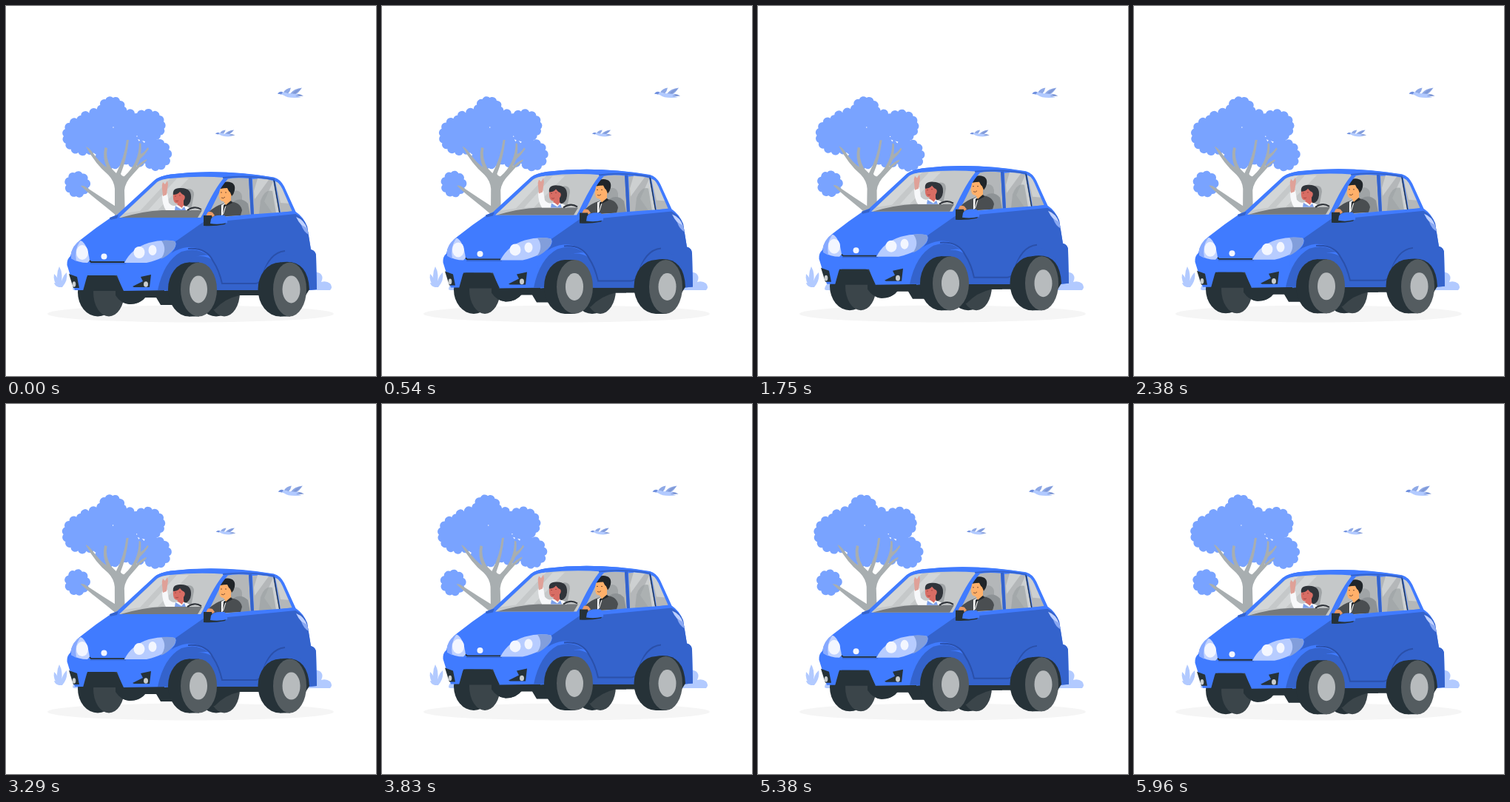
An HTML page for the animation above (6000 ms loop, 500x500 px).

```html
<!DOCTYPE html>
<html lang="en">
<head>
<meta charset="utf-8">
<title>Car trip</title>
<style>
html, body { margin: 0; width: 100%; height: 100%; overflow: hidden; background: #fff; }
svg { display: block; width: 100vw; height: 100vh; }
</style>
</head>
<body>
<svg viewBox="0 0 500 500">
  <defs>
    <g id="bird">
      <path fill="#8fa9e6" d="M8 6Q11 1 18 0Q17 5 14 8ZM17 8Q22 1 33 0L30 4Q27 8 20 11Z"/>
      <path fill="#7f98d6" d="M20 8Q25 2 32 1L24 8ZM23 9Q29 7 35 11Q27 12 22 12Z"/>
      <path fill="#b2caff" d="M0 8Q3 4 8 6Q14 8 20 8Q26 8 29 10L24 11L32 13Q14 15 8 10Q4 8 0 8Z"/>
      <path fill="#6f8fdd" d="M0 8Q3 4 7 6L5 9Z"/>
    </g>
  </defs>

  <ellipse cx="249.5" cy="416" rx="193.5" ry="11.5" fill="#f5f5f5"/>

  <g fill="#b2caff">
    <path d="M72 380Q66 364 72 352Q78 362 74 380ZM71 380Q63 372 65 362Q72 368 73 380ZM74 380Q75 366 82 360Q84 371 76 380ZM72 380Q66 379 65 374Q70 374 74 380Z"/>
    <path d="M90 383Q91 374 98 375L110 384H92Z"/>
    <path d="M405 384V362Q416 357 424 361Q430 365 426 373Q433 371 438 375Q442 380 438 384Z"/>
  </g>

  <g id="tree">
    <path id="leaves" fill="#79a3ff"/>
    <g fill="#fff"><path d="M178 180l3 1l-1 2zM184 182l4 1l-1 2z"/><circle cx="145" cy="164" r=".7"/><circle cx="177" cy="176" r=".7"/></g>
    <g fill="#a8aeb0">
      <path d="M147 290L147 247Q146 236 138 228Q121 214 108 190Q112 191 117 198Q127 212 136 218Q130 205 133.500 191L137 192Q134 205 142 219L149 226Q160 205 163 181L166 181Q163 207 155 227Q157 231 160 230Q180 212 180 185L182.500 186Q183 194 182 200Q187 198 191.500 191L193 193Q188 201 181 207Q179 212 176 217Q183 210 190 207L190 209Q180 217 171 228Q161 238 160 249L161 290Z"/>
      <path d="M101 243Q105 242 110 246Q131 260 150 272V284Q137 273 123 262Q108 250 101 243Z"/>
    </g>
  </g>

  <g id="birds">
    <use href="#bird" x="367" y="110.500"/>
    <use href="#bird" transform="translate(283 167.500) scale(.76 .66)"/>
  </g>

  <g id="car">
    <!-- underside and far wheels -->
    <path fill="#263238" d="M100 375H405V391H316L230 404H209L203 394H187Q181 403 167 403Q155 402 148 391L140 384H100Z"/>
    <ellipse cx="124" cy="387" rx="27" ry="32.500" fill="#263238"/>
    <ellipse cx="139" cy="387" rx="21" ry="32.500" fill="#3b454a"/>
    <path fill="#263238" d="M148 380H190V392Q182 403 167 403Q155 402 148 391Z"/>
    <ellipse cx="284" cy="387" rx="27" ry="32.500" fill="#263238"/>
    <ellipse cx="295" cy="387" rx="21" ry="32.500" fill="#3b454a"/>
    <path fill="#263238" d="M272 380H330V391H316Q296 395 282 410H272Z"/>

    <!-- body -->
    <path fill="#407bff" d="M93 384L82.500 350Q82 342 87 338Q89 324 102 315Q122 299 143 285L150 282L201 235Q207 230 222 227.500Q290 219.500 362 231.500Q371 234 376 244L391.500 278Q402 285 407 298L412 329Q419 331 419 338L420 383L409 384H225L158 385L150 364H110L106 384Z"/>
    <path fill="#3463cc" d="M228 328Q232 319 228 319L268 291L300 290L391.500 281Q402 286 407 298L412 329Q419 331 419 338L420 383L409 384H225Q237 340 262 332Q240 324 222 343L214 347Z"/>
    <path fill="#407bff" d="M214 385L210 350Q221 329 245 326Q268 325 279 343Q263 333 246 343Q231 354 225 384Z"/>
    <path fill="#3463cc" d="M205 384Q213 345 237 332Q258 325 273 337Q239 334 226 384Z"/>
    <path fill="none" stroke="#2a50aa" stroke-width="2" d="M246 328Q271 326 280 345Q288 357 292 375H337Q343 375 346 367Q355 333 377 331"/>
    <path fill="#3463cc" d="M287 384L283 356L291 377H343L350 355Q360 335 382 335Q406 338 409 384Z"/>
    <path fill="#bfd1ff" d="M392 285Q403 289 407 301Q398 298 392 285Z"/>
    <path fill="#8ba9f2" d="M399 296L407 300L409 309Q402 305 399 296Z"/>

    <!-- cabin -->
    <g id="cabin">
      <path fill="#c5c8c9" d="M153 286L204 238Q209 234 222 233Q260 229 297 232L263 286Z"/>
      <path fill="#d3d6d7" d="M160 280L205 238Q212 234 222 233L181 277ZM231 233H247L205 276H192Z"/>
      <path fill="#b4b7b9" d="M270 289L297 234Q310 231 328 233L331 283Z"/>
      <path fill="#a0a4a6" d="M245 247Q254 246 254 255L250 276H238ZM304 251Q317 246 319 257V282H303Z"/>
      <path fill="#8d9295" d="M308 264Q318 258 327 267L330 283H305Z"/>
      <path fill="#75797c" d="M155 286Q186 277 211 276H265L259 286Z"/>

      <!-- passenger -->
      <path fill="#30343a" d="M226 256Q224 245 237 246Q251 246 250 260Q249 269 242 271L232 266Z"/>
      <path fill="#d86d64" d="M226 255Q232 255 235 251Q238 255 241 256Q243 259 240 263L240 268L243 273L230 276L232 267Q225 267 226 255Z"/>
      <path fill="none" stroke="#8f3937" stroke-width=".7" d="M228 257h2M234 256h2M229 263q2 2 4 0"/>
      <path fill="#f7f8fa" d="M211 256L218 253L220 266Q225 272 231 269L240 270Q248 271 250 276H216Q211 268 211 256Z"/>
      <path fill="#d86d64" d="M231 268L240 268L238 273Z"/>
      <path fill="#7b9fea" d="M229 270L237 275L241 271L243 276H228Z"/>
      <path fill="#dfa198" d="M212 257L211 247Q210 242 212 238L215 241L218 236L219 241Q218 247 217 255Z"/>
      <path fill="none" stroke="#30343a" stroke-width="2" d="M245 276Q255 269 264 275"/>

      <!-- driver -->
      <path fill="#4a4e51" d="M269 284Q278 273 288 269L302 264Q317 265 319 276L317 283L283 285L275 295Z"/>
      <path fill="#fff" d="M291 269L299 265L294 281L291 284Z"/>
      <path fill="#25292c" d="M294 269L304 263L306 266L296 271L293 281Z"/>
      <path fill="#ffb06a" d="M289 247Q297 241 307 249Q308 255 304 257L304 263L297 269L294 264Q288 264 288 256Z"/>
      <path fill="#202529" d="M290 247Q288 238 299 237.500Q311 238 309 249Q308 254 305 257L303 252L301 250L299 246Q294 246 290 247Z"/>
      <path fill="none" stroke="#5f3827" stroke-width=".8" d="M290 252h2M296 252h2M291 259q3 2 5-1"/>
      <path fill="#e99b66" d="M269 283Q272 276 279 279L282 283L274 289L269 288Z"/>

      <path fill="#b4b7b9" d="M333 234Q348 232 361 236L369 280L335 282ZM364 237Q373 240 377 251L388 277L371 279Z"/>
      <path fill="#cdd0d1" d="M340 233L355 235L336 261L335 250ZM361 237L369 280H360L349 264ZM364 237Q373 240 377 251L384 267L371 266Z"/>
      <path fill="#9a9fa1" d="M344 263Q350 247 360 250L365 280L342 281Z" opacity=".65"/>
    </g>
    <g fill="none" stroke="#407bff">
      <path stroke="#3463cc" stroke-width="4" d="M330 232L333 284"/>
      <path stroke="#263238" stroke-width="1.2" d="M362 235L370 281"/>
      <path stroke-width="5" d="M298 232Q284 247 266 287"/>
      <path stroke-width="3" d="M151 285L203 236Q208 231 223 229Q290 221 362 233.500Q370 236 375 247L389 279L332 283L288 287"/>
      <path stroke="#3463cc" stroke-width="2" d="M293 232Q328 228 363 234.500"/>
    </g>
    <path fill="#263238" d="M267 283L278 283L280 290L298 292L296 295Q281 298 267 297Z"/>
    <path fill="#407bff" d="M277 288Q279 282 295 283Q300 286 299 293Q287 296 276 294Z"/>
    <path fill="#3463cc" d="M140 286L152 282L150 287L141 289Z"/>

    <!-- front -->
    <path fill="#c0d2ff" d="M88 341Q87 325 101 317Q110 321 113 344L110 347Q98 347 88 341Z"/>
    <path fill="#86a9ff" d="M88 341Q87 325 100 318Q92 329 95 345Z"/>
    <path fill="#b7ccff" d="M160 347Q170 327 193 320Q212 315 228 318Q231 321 227 328Q216 341 190 347Z"/>
    <path fill="#829edb" d="M210 317Q222 316 228 318Q231 321 227 328Q219 338 209 342Q219 329 210 317Z"/>
    <g fill="#f3f6ff">
      <ellipse cx="103" cy="333" rx="8" ry="10"/>
      <ellipse cx="180" cy="333" rx="7.500" ry="8"/>
      <ellipse cx="198" cy="330" rx="5.500" ry="7"/>
      <circle cx="132.500" cy="338.500" r="4"/>
    </g>
    <path fill="none" stroke="#263238" stroke-width="1.8" d="M113 344L115 346H160"/>
    <path fill="none" stroke="#3463cc" stroke-width="1" d="M114 348H162"/>
    <g fill="#263238">
      <path d="M104 385L109 367Q110 364 114 364H145Q149 364 151 368L159 385Z"/>
      <path d="M85 362L96 366L99 381H91ZM171 379L185 372L182 366L196 363L194 380H173Z"/>
    </g>
    <ellipse cx="92" cy="376" rx="2.300" ry="3.800" fill="#c9cdcf"/>
    <ellipse cx="189" cy="376" rx="3" ry="3.800" fill="#c9cdcf"/>

    <!-- near wheels -->
    <g fill="#263238">
      <ellipse cx="247" cy="383" rx="28" ry="36.500"/>
      <path d="M247 346.500H261V419.500H247Z"/>
      <ellipse cx="370" cy="383" rx="29.500" ry="36.500"/>
      <path d="M370 346.500Q408 340 410 383L405 391L384 419.500H370Z"/>
    </g>
    <g fill="#545c60">
      <ellipse cx="260.500" cy="383" rx="24.500" ry="36.500"/>
      <ellipse cx="383.500" cy="383" rx="22.500" ry="36.500"/>
    </g>
    <g fill="#b7bbbd">
      <ellipse cx="260" cy="383" rx="12" ry="18.500"/>
      <ellipse cx="385.500" cy="383" rx="12" ry="18.500"/>
    </g>
  </g>
</svg>
<script>
const LOOP = 6000;
const el = id => document.getElementById(id);

// A ring of round bumps on an ellipse.
function scallop(cx, cy, rx, ry) {
  const bumps = Math.round((rx + ry) * 0.3);
  let d = "";
  for (let i = 0; i <= bumps; i++) {
    const a = (i + 0.4) / bumps * Math.PI * 2;
    const x = (cx + rx * Math.cos(a)).toFixed(1), y = (cy + ry * Math.sin(a)).toFixed(1);
    d += i ? `A6 6 0 0 1 ${x} ${y}` : `M${x} ${y}`;
  }
  return d + "Z";
}

el("leaves").setAttribute("d", [
  [143, 143, 18, 19], [105, 175, 27, 24], [120, 159, 25, 15], [153, 165, 34, 25], [191, 162, 23, 20],
  [143, 194, 22, 25], [175, 195, 25, 20], [203, 201, 18, 20], [96.5, 241, 15, 16]
].map(b => scallop(...b)).join(""));

// Linear interpolation through [time, value] pairs.
function track(points, t) {
  const i = points.findIndex(p => p[0] > t);
  const [t0, v0] = points[i - 1], [t1, v1] = points[i];
  return v0 + (v1 - v0) * (t - t0) / (t1 - t0);
}

const bounce = [[0, 0], [1500, -10], [3000, 0], [4500, -10], [LOOP, 0]];
const sway = [[0, 0], [1500, 1], [4500, -1], [LOOP, 0]];
const drift = [[0, 0], [2400, 4.6], [4100, -2.6], [LOOP, 0]];

function draw(time) {
  const t = time % LOOP;
  el("car").setAttribute("transform", `translate(0 ${track(bounce, t)})`);
  el("tree").setAttribute("transform", `rotate(${track(sway, t)} 150 286)`);
  el("birds").setAttribute("transform", `translate(${track(drift, t)} 0)`);
}

const start = performance.now();
function tick() {
  draw(performance.now() - start);
  requestAnimationFrame(tick);
}
draw(0);
requestAnimationFrame(tick);
</script>
</body>
</html>
```
